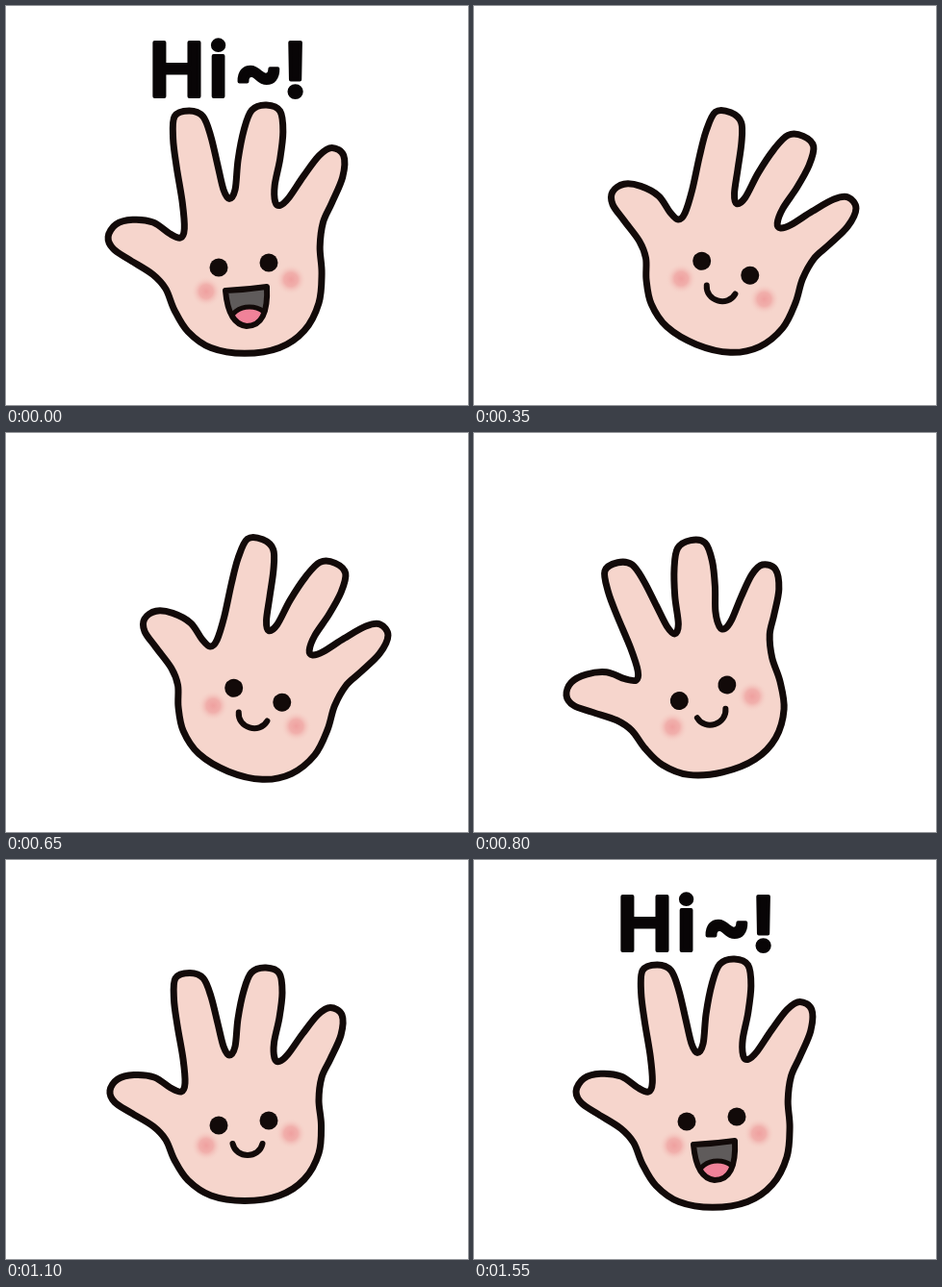
An HTML page for the animation above (1600 ms loop, 480 by 415 pixels).

```html
<!DOCTYPE html>
<html lang="en">
<head>
<meta charset="utf-8">
<title>Waving hand</title>
<style>
  html, body { margin: 0; width: 100%; height: 100%; overflow: hidden; background: #fff; }
  svg { display: block; width: 100%; height: 100%; }
  .line { stroke: #120a09; stroke-linecap: round; stroke-linejoin: round; }
  #word { font: 600 77px Inter, "Open Sans", sans-serif; text-anchor: middle; fill: #080506; stroke: #080506; stroke-width: 4; stroke-linejoin: round; }
</style>
</head>
<body>
<svg viewBox="0 0 480 415">
  <defs>
    <radialGradient id="blush">
      <stop offset="0" stop-color="#efa09f"/>
      <stop offset=".45" stop-color="#f0a9a6" stop-opacity=".85"/>
      <stop offset="1" stop-color="#f6d5cc" stop-opacity="0"/>
    </radialGradient>
    <clipPath id="lips"><path d="M228 296Q250 295 271 292Q273 333 250 333Q231 331 228 296Z"/></clipPath>
  </defs>

  <text id="word" x="177.5 220.5 262.5 300.5" y="94">Hi~!</text>

  <g id="hand">
    <path id="skin" class="line" fill="#f6d5cc" stroke-width="7"/>
    <circle cx="208" cy="297" r="16" fill="url(#blush)"/>
    <circle cx="296" cy="284.5" r="16" fill="url(#blush)"/>
    <g id="eyes" fill="#120a09">
      <circle cx="221" cy="276" r="9.5"/>
      <circle cx="273" cy="271" r="9.5"/>
    </g>
    <path id="smile" class="line" d="M235.500 295C239 311 263 311 266.500 295" fill="none" stroke-width="6"/>
    <g id="small">
      <path class="line" d="M238.500 299.500Q252 301 263 297.500Q263 313.500 251.500 313.500Q240 313 238.500 299.500Z" fill="#120a09" stroke-width="5"/>
      <path d="M243.500 307Q251 301.500 259 305.500Q257 311 251 311Q246 311 243.500 307Z" fill="#ee8198"/>
    </g>
    <g id="open">
      <g clip-path="url(#lips)">
        <path d="M220 285h60v60h-60Z" fill="#5f5b5b"/>
        <ellipse class="line" cx="253" cy="328" rx="20" ry="15" fill="#f08299" stroke-width="5"/>
      </g>
      <path class="line" d="M228 296Q250 295 271 292Q273 333 250 333Q231 331 228 296Z" fill="none" stroke-width="6"/>
    </g>
  </g>
</svg>

<script>
const LOOP = 1600;
const PIVOT = '246 309';
const $ = id => document.getElementById(id);

// Resting outline, clockwise from the thumb tip.
const outline = [
  [108, 240], [116, 228], [133, 223.5], [154, 226], [171, 237], [182, 241], [186, 232],
  [184, 207], [178, 172], [174.5, 145], [176, 123], [191, 117.5], [205, 123], [213, 142], [220, 170],
  [226, 194], [232, 203], [238, 194], [241, 165], [247, 136], [255, 117], [270, 112], [284, 118],
  [287, 138], [284, 164], [278.5, 190], [279, 206], [284, 209.5], [293, 202], [308, 181], [324, 161],
  [337, 153.5], [349, 161], [348, 182], [337, 207], [328, 226], [325, 250], [327.5, 276],
  [325, 305], [310, 332], [284, 349], [248, 354.5], [213, 349], [189, 333], [175, 312],
  [166, 291], [153, 277], [130, 263], [113, 252]
];

const rest = { turn: 0, up: 1, down: 1, side: 0, face: 0, tilt: 0, mouth: 'smile', gape: 1, word: 0 };
const pose = changes => ({ ...rest, ...changes });
const wave = turn => pose({ turn, face: -4, tilt: -5 });

const big = pose({ up: 1.07, down: 1.06, side: -.015, face: -4, mouth: 'open', word: 1 });
const medium = pose({ up: 1.03, down: 1.015, side: -.01, face: -2, mouth: 'open', gape: .78, word: .915 });
const squashed = pose({ up: .9, side: .085, face: 2, mouth: 'small', word: .83 });
const left = wave(-13), right = wave(22);

const steps = [
  [0, big], [50, medium], [200, wave(7)],
  [350, right], [500, left], [650, right], [800, left], [950, right],
  [1100, rest], [1400, squashed], [1550, big]
];

// Stretches fingers and palm apart from each other around the thumb's root.
function warp([x, y], { up, down, side }) {
  const reach = Math.min(1, Math.max(0, (300 - y) / 60));
  return [232 + (x - 232) * (1 - side * reach), 240 + (y - 240) * (y < 240 ? up : down)];
}

function smoothPath(points) {
  const at = i => points[(i + points.length) % points.length];
  const handle = (i, sign) => at(i).map((v, k) => (v + sign * (at(i + 1)[k] - at(i - 1)[k]) / 6).toFixed(2));
  const curves = points.map((_, i) => `C${handle(i, 1)} ${handle(i + 1, -1)} ${at(i + 1)}`);
  return `M${points[0]}${curves.join('')}Z`;
}

const scaleAbout = (x, y, s) => `translate(${x} ${y}) scale(${s}) translate(${-x} ${-y})`;

function show(p) {
  $('skin').setAttribute('d', smoothPath(outline.map(point => warp(point, p))));
  $('hand').setAttribute('transform', `rotate(${p.turn} ${PIVOT})`);
  $('eyes').setAttribute('transform', `translate(0 ${p.face})`);
  $('smile').setAttribute('transform', `translate(0 ${p.face * .75}) rotate(${p.tilt} 251 300)`);
  $('open').setAttribute('transform', scaleAbout(250, 304, p.gape));
  for (const id of ['smile', 'small', 'open']) $(id).style.display = id === p.mouth ? '' : 'none';
  $('word').style.display = p.word ? '' : 'none';
  $('word').setAttribute('transform', scaleAbout(231, 97, p.word || 1));
}

let current;
function tick() {
  const time = performance.now() % LOOP;
  const next = steps.findLast(([start]) => start <= time)[1];
  if (next !== current) show(current = next);
  requestAnimationFrame(tick);
}
tick();
</script>
</body>
</html>
```
